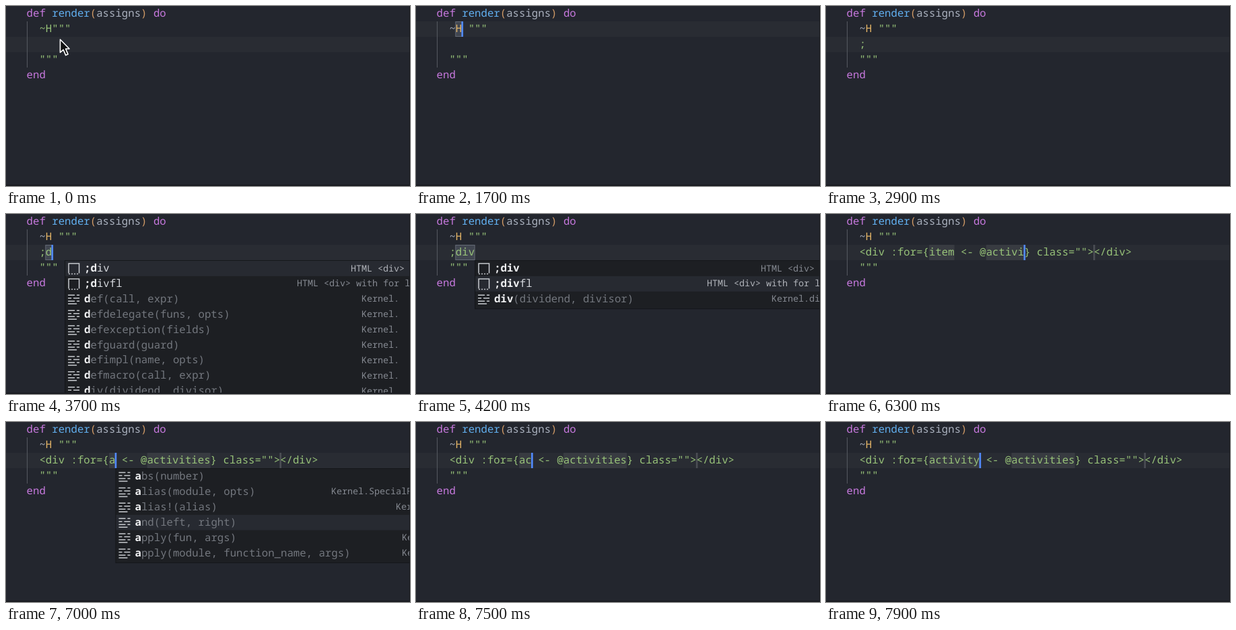
Animation of 600 by 269 pixels, one loop 8000 ms. Source, as an HTML page:

```html
<!DOCTYPE html>
<html lang="en">
<head>
<meta charset="utf-8">
<title>Editor snippet</title>
<style>
  html, body { margin: 0; width: 100%; height: 100%; overflow: hidden; background: #23262e; }
  svg { display: block; position: absolute; left: 0; top: 0; }
  text {
    font: 15.7px "Noto Sans Mono", "DejaVu Sans Mono", monospace;
    white-space: pre;
    text-rendering: geometricPrecision;
  }
  .detail { font-size: 13.35px; }
  .match { font-weight: 700; fill: #f0f1f3; }
</style>
</head>
<body>
<svg width="600" height="269" viewBox="0 0 600 269">
  <rect width="600" height="269" fill="#23262e"/>
  <g id="scene"></g>
  <path id="mouse" d="M0 0V19.5L4.6 15.3L8.2 23.6L11.6 22.1L8.1 14H13.6Z"
        fill="#111" stroke="#fff" stroke-width="1.6" stroke-linejoin="round"/>
  <path d="M599.5 0V269" stroke="#15171b"/>
  <path d="M0 268H600" stroke="#191b20" stroke-width="2"/>
</svg>
<script>
const LOOP = 8000, X0 = 30.6, CW = 9.42, ROW = 23, ITEM = 22.9;
const C = {
  key: '#c678dd', fn: '#61afef', paren: '#d19a66', plain: '#abb2bf',
  str: '#98c379', mod: '#e5b567', cursor: '#528bff',
};
const scene = document.getElementById('scene');
const mouse = document.getElementById('mouse');
const colX = c => X0 + c * CW;

// Completion rows: [matched, rest, detail, detail x]
const KERNEL = ['Kernel.', 528];
const DIV = [';div', '', 'HTML <div>', 512];
const DIVFL = [';div', 'fl', 'HTML <div> with for loop', 432];
const MENUS = {
  d: { col: 6, pick: 0, rows: [
    [';d', 'iv', 'HTML <div>', 512], [';d', 'ivfl', 'HTML <div> with for loop', 432],
    ['d', 'ef(call, expr)', ...KERNEL], ['d', 'efdelegate(funs, opts)', ...KERNEL],
    ['d', 'efexception(fields)', ...KERNEL], ['d', 'efguard(guard)', ...KERNEL],
    ['d', 'efimpl(name, opts)', ...KERNEL], ['d', 'efmacro(call, expr)', ...KERNEL],
    ['d', 'iv(dividend, divisor)', ...KERNEL]] },
  div: { col: 6, pick: 1, rows: [DIV, DIVFL, ['div', '(dividend, divisor)', 'Kernel.div/2', 528]] },
  a: { col: 14, pick: 3, rows: [
    ['a', 'bs(number)'],
    ['a', 'lias(module, opts)', 'Kernel.SpecialForms', 483],
    ['a', 'lias!(alias)', 'Kernel.', 579],
    ['a', 'nd(left, right)'],
    ['a', 'pply(fun, args)', 'Kernel.', 588],
    ['a', 'pply(module, function_name, args)', 'Kernel.', 588]] },
};

// Snippet with its tab stops; field is the one being edited
function snippet(item, list, field, selected) {
  const body = `<div :for={${item} <- @${list}} class=""></div>`;
  const listCol = 18 + item.length;
  const end = { item: 13 + item.length, list: listCol + list.length }[field];
  return {
    body, cur: end, on: true, menu: null, row: selected ? -1 : 2,
    marks: [
      [2, 13, item.length, selected && field === 'item'],
      [2, listCol, list.length, selected && field === 'list'],
      [2, listCol + list.length + 11, 0],
    ],
  };
}

const steps = [
  [0, { spaced: false, body: '', row: 2, cur: 2, on: false, marks: [], menu: null }],
  [90, { on: true }],
  [390, { row: 1 }],
  [690, { cur: 3 }],
  [890, { cur: 4 }],
  [1090, { spaced: true, cur: 5 }],
  [1490, { cur: 4, marks: [[1, 3, 1, true, true]] }],
  [2090, { cur: 8, marks: [] }],
  [2390, { row: 2, cur: 2 }],
  [2590, { body: ';', cur: 3 }],
  [2880, { on: false }],
  [3190, { on: true }],
  [3590, { body: ';d', cur: 4, menu: 'd', marks: [[2, 3, 1, true, true]] }],
  [3790, { body: ';di', cur: 5, menu: 'div', marks: [[2, 3, 2, true, true]] }],
  [3990, { body: ';div', cur: 6, marks: [[2, 3, 3, true, true]] }],
  [4180, { on: false }],
  [4490, snippet('item', 'list_of_items', 'list', true)],
  [4890, { on: false }],
  [5090, { on: true }],
  [5480, { on: false }],
];
[...'activities'].forEach((_, i, w) =>
  steps.push([5790 + i * 88, snippet('item', w.slice(0, i + 1).join(''), 'list')]));
steps.push([6690, snippet('item', 'activities', 'item', true)]);
steps.push([6890, { ...snippet('a', 'activities', 'item'), menu: 'a' }]);
[...'ctivity'].forEach((_, i, w) =>
  steps.push([7430 + i * 72, snippet('a' + w.slice(0, i + 1).join(''), 'activities', 'item')]));

function el(tag, attrs, content) {
  const node = document.createElementNS('http://www.w3.org/2000/svg', tag);
  for (const k in attrs) node.setAttribute(k, attrs[k]);
  if (content !== undefined) node.textContent = content;
  return node;
}
const add = (...args) => scene.appendChild(el(...args));
const rect = (x, y, width, height, fill, more) => add('rect', { x, y, width, height, fill, ...more });

function line(row, col, ...parts) {
  const text = add('text', { x: colX(col), y: 16 + row * ROW });
  for (const [fill, s] of parts) text.appendChild(el('tspan', { fill }, s));
}

function mark([row, col, len, strong, boxed]) {
  const y = row * ROW;
  if (!len) return rect(colX(col) - 1, y, 2.6, ROW, '#4b4e54');
  const style = boxed ? { stroke: '#646a75', 'stroke-width': 1 } : { rx: strong ? 3 : 1 };
  rect(colX(col), y + (boxed ? .5 : 0), len * CW, ROW - (boxed ? 1 : 0),
    boxed ? '#414650' : strong ? '#484c58' : '#383b41', style);
}

function icon(x, y, isSnippet) {
  const g = { fill: 'none', stroke: '#c8cbd0', 'stroke-width': 1.5, transform: `translate(${x} ${y})` };
  if (isSnippet) {
    add('path', { ...g, d: 'M1 7V-7.5H16.5V7' });
    add('path', { ...g, d: 'M1 8H17', 'stroke-dasharray': '2 2' });
  } else {
    add('path', { ...g, d: 'M0-6H10M13-6H17M0-1.5H5M8-1.5H17M0 3H10M13 3H17M0 7H13' });
  }
}

function drawMenu({ col, pick, rows }) {
  const x = colX(col), top = ROW * 3;
  rect(x + .5, top + .5, 620, rows.length * ITEM + 3.5, '#1d1f23', { stroke: '#15171a' });
  rows.forEach(([match, rest, detail, dx], i) => {
    const y = top + 1 + i * ITEM, isSnippet = match[0] === ';', picked = i === pick;
    if (picked) rect(x + 1, y, 620, ITEM, '#272a31');
    icon(x + 5, y + 11.5, isSnippet);
    const label = add('text', { x: x + 29, y: y + 16 });
    label.appendChild(el('tspan', { class: 'match' }, match));
    label.appendChild(el('tspan', { fill: isSnippet ? '#d5d8dd' : '#73777e' }, rest));
    if (detail) add('text', { class: 'detail', x: dx, y: y + 15.5, fill: picked ? '#b0b3b9' : '#858991' }, detail);
  });
}

function draw(s) {
  scene.replaceChildren();
  if (s.row >= 0) rect(0, s.row * ROW, 600, ROW, '#292c33');
  rect(31, ROW, 1, ROW * 3, '#555960');
  s.marks.forEach(mark);
  line(0, 0, [C.key, 'def '], [C.fn, 'render'], [C.paren, '('], [C.plain, 'assigns'],
    [C.paren, ')'], [C.key, ' do']);
  if (s.spaced) line(1, 2, [C.plain, '~'], [C.mod, 'H'], [C.str, ' """']);
  else line(1, 2, [C.str, '~H"""']);
  line(2, 2, [C.str, s.body]);
  line(3, 2, [C.str, '"""']);
  line(4, 0, [C.key, 'end']);
  if (s.on) rect(colX(s.cur) - .8, (s.row < 0 ? 2 : s.row) * ROW, 2.6, ROW, C.cursor);
  if (s.menu) drawMenu(MENUS[s.menu]);
}

function moveMouse(t) {
  const p = Math.min(1, Math.max(0, (t - 50) / 140));
  const e = p * p * (3 - 2 * p);
  mouse.setAttribute('transform', `translate(${80.5 + 112 * e} ${50 + 99 * e})`);
  mouse.setAttribute('visibility', t < 390 ? 'visible' : 'hidden');
}

let shown = -1;
const start = performance.now();
function frame(now) {
  const t = Math.max(0, now - start) % LOOP;
  const n = steps.filter(([at]) => at <= t).length;
  if (n !== shown) {
    draw(Object.assign({}, ...steps.slice(0, n).map(([, patch]) => patch)));
    shown = n;
  }
  moveMouse(t);
  requestAnimationFrame(frame);
}
frame(start);
</script>
</body>
</html>
```
